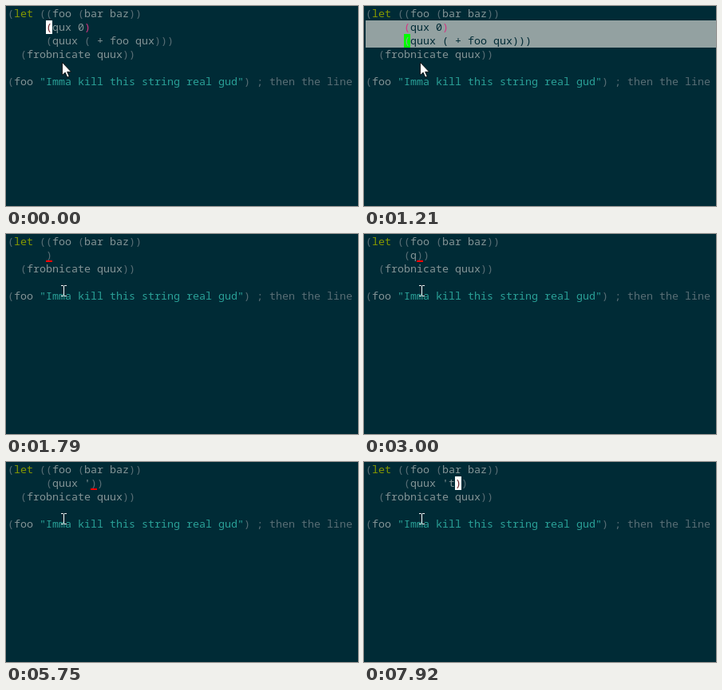
These frames come from a looping animation (441x250 px, 8 s). An HTML page:

```html
<!DOCTYPE html>
<html lang="en">
<head>
<meta charset="utf-8">
<title>Editing Lisp</title>
<style>
html, body { margin: 0; width: 100%; height: 100%; overflow: hidden; background: #002b36; }
svg { display: block; width: 441px; height: 250px; }
text { font: 13.3333px "Noto Sans Mono", "DejaVu Sans Mono", monospace; white-space: pre; fill: #839496; }
.paren, .comment { fill: #586e75; }
.keyword { fill: #859900; }
.string { fill: #2aa198; }
.picked { fill: #002b36; }
.match { fill: #d33682; }
.on-block { fill: #6b2328; }
.on-visual { fill: #93a1a1; }
.region { fill: #93a1a1; }
.block { fill: #fff; }
.visual { fill: #0f0; }
.bar { fill: #f00; }
.arrow { fill: #fff; stroke: #000; stroke-width: .8; }
.beam { fill: none; stroke: #fff; }
</style>
</head>
<body>
<svg viewBox="0 0 441 250">
  <g id="back" shape-rendering="crispEdges"></g>
  <g id="code"></g>
  <path id="arrow" class="arrow" d="M70.5 70.5v16l3.7-3.4 2.6 6 2.4-1-2.6-5.8h5z"/>
  <path id="beam" class="beam" d="M69 64.5h3m1 0h3M69 77.5h3m1 0h3M72.5 65v12"/>
</svg>
<script>
const LOOP = 8000, LEFT = 2, TOP = 1, CHAR = 8, ROW = 17, INDENT = 6;
const pad = ' '.repeat(INDENT);
const head = '(let ((foo (bar baz))';
const tail = ['  (frobnicate quux))', '', '(foo "Imma kill this string real gud") ; then the line'];
const whole = [head, pad + '(qux 0)', pad + '(quux ( + foo qux)))', ...tail];

// Closing column of the pair that opens at INDENT, by row
const closer = { 1: 12, 2: 24 };

const select = (cursor, row, matchRow, rows) =>
  ({ lines: whole, cursor, row, col: INDENT, matchRow, rows, pointer: 'arrow' });

const type = (cursor, typed) => ({
  lines: [head, pad + typed + (typed ? '))' : ')'), ...tail],
  cursor, row: 1, col: INDENT + typed.length, matchRow: 0, rows: 0, pointer: 'beam'
});

const steps = [
  [0, select('block', 1, 1, 0)],
  [530, select('', 1, 1, 0)],
  [680, select('visual', 1, 1, 1)],
  [1210, select('visual', 2, 1, 2)],
  [1360, select('visual', 2, 2, 2)],
  [1670, select('', 2, 2, 2)],
  [1790, type('bar', '')],
  [2190, type('', '')],
  [2440, type('bar', '(')],
  [3000, type('bar', '(q')],
  [3150, type('bar', '(qu')],
  [3430, type('bar', '(quu')],
  [3580, type('bar', '(quux')],
  [3700, type('bar', '(quux ')],
  [4290, type('', '(quux ')],
  [4720, type('bar', '(quux ')],
  [5320, type('', '(quux ')],
  [5750, type('bar', "(quux '")],
  [6060, type('bar', "(quux 't")],
  [6460, type('', "(quux 't")],
  [6920, type('block', "(quux 't")],
  [7480, type('', "(quux 't")],
  [7920, type('block', "(quux 't")]
];

const byId = id => document.getElementById(id);
const x = col => LEFT + col * CHAR;
const y = row => TOP + row * ROW;

function add(parent, tag, attrs, text = '') {
  const el = document.createElementNS('http://www.w3.org/2000/svg', tag);
  for (const key in attrs) el.setAttribute(key, attrs[key]);
  el.textContent = text;
  parent.append(el);
}

const rect = (cls, left, top, width, height) =>
  add(byId('back'), 'rect', { class: cls, x: left, y: top, width, height });

function style(s, word, row, col) {
  const under = row === s.row && col === s.col;
  if (under && (s.cursor === 'block' || s.cursor === 'visual')) return 'on-' + s.cursor;
  if (s.matchRow && row === s.matchRow && (col === INDENT || col === closer[row])) return 'match';
  if (row >= 1 && row <= s.rows) return 'picked';
  if (word === 'let') return 'keyword';
  return { '(': 'paren', ')': 'paren', '"': 'string', ';': 'comment' }[word[0]] || 'plain';
}

function draw(s) {
  byId('back').replaceChildren();
  byId('code').replaceChildren();
  if (s.rows) rect('region', LEFT, y(1), 441 - LEFT, s.rows * ROW);
  if (s.cursor) {
    const height = s.cursor === 'bar' ? 2 : ROW;
    rect(s.cursor, x(s.col), y(s.row + 1) - height, CHAR, height);
  }
  s.lines.forEach((line, row) => {
    for (const m of line.matchAll(/"[^"]*"|;.*|[()]|[^\s()]+/g))
      add(byId('code'), 'text', { class: style(s, m[0], row, m.index), x: x(m.index), y: y(row) + 13 }, m[0]);
  });
  for (const id of ['arrow', 'beam'])
    byId(id).setAttribute('visibility', id === s.pointer ? 'visible' : 'hidden');
}

let shown;
const start = performance.now();
function tick() {
  const t = (performance.now() - start) % LOOP;
  const state = steps.findLast(([at]) => at <= t)[1];
  if (state !== shown) draw(shown = state);
  requestAnimationFrame(tick);
}
tick();
</script>
</body>
</html>
```
